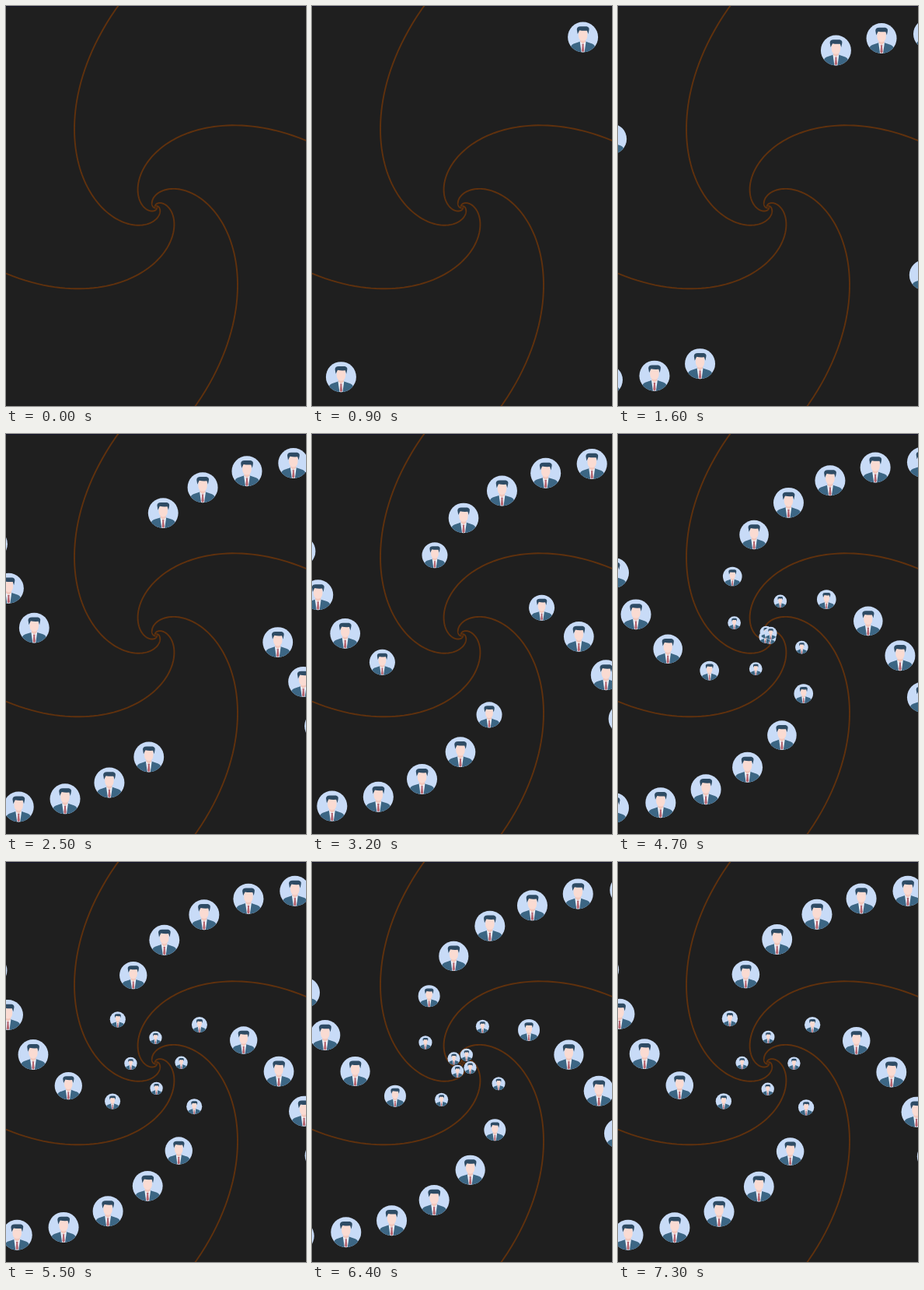
Animation of 386 by 514 pixels, one loop 7.4 s. Source, as an HTML page with a canvas:

```html
<!DOCTYPE html>
<html lang="en">
<head>
<meta charset="utf-8">
<title>Spiral queue</title>
<style>
  html, body { margin: 0; width: 100%; height: 100%; overflow: hidden; background: #1f1f1f; }
  canvas { display: block; }
</style>
</head>
<body>
<canvas id="stage" width="386" height="514"></canvas>
<script>
const ctx = document.getElementById('stage').getContext('2d');
const W = 386, H = 514, CX = 193, CY = 258.3;
const LOOP = 7400, STEP = 100;
const SPEED = 0.06944;        // radial pixels per ms
const GAP = SPEED * 604;      // radial distance between neighbours
const START = 330.6;          // radius of the leading avatar at time 0
const GROWTH = 0.955, REF_RADIUS = 145;
const ARM_ANGLE = 43.6 * Math.PI / 180;

// Point on a logarithmic spiral, turned by the given angle.
function spiral(r, turn) {
  const a = ARM_ANGLE + turn + Math.log(r / REF_RADIUS) / GROWTH;
  return [CX + r * Math.cos(a), CY + r * Math.sin(a)];
}

function fillPath(color, d) {
  ctx.fillStyle = color;
  ctx.fill(new Path2D(d));
}

// Avatar drawn in a circle of radius 20, scaled to the wanted diameter.
function avatar(x, y, diameter) {
  ctx.save();
  ctx.translate(x, y);
  ctx.scale(diameter / 40, diameter / 40);
  ctx.beginPath();
  ctx.arc(0, 0, 20, 0, 2 * Math.PI);
  ctx.fillStyle = '#c8dbf7';
  ctx.fill();
  ctx.clip();
  fillPath('#3c6684', 'M-16 20V13Q-15 9-10 8L-4 6H4L10 8Q15 9 16 13V20Z');
  fillPath('#eceff7', 'M-4 6H4L2 20H-2Z');
  fillPath('#f3c8bd', 'M-3.5 1H3.5V6L0 9L-3.5 6Z');
  fillPath('#fadbd2', 'M-5.8 -9H5.8V-1Q5 5 0 5Q-5 5-5.8-1Z');
  fillPath('#2e4b64', 'M-7 -4L-8 -10Q-8 -14-3 -14H5Q9 -13 8 -9L7 -4L5.5 -8.5Q0 -8-4.5 -9L-5.5 -7Z');
  fillPath('#b5646f', 'M-1.4 9H1.4L1 11L1.7 18L0 20L-1.7 18L-1 11Z');
  ctx.restore();
}

function drawArms() {
  ctx.strokeStyle = '#60310d';
  ctx.lineWidth = 1.9;
  for (let arm = 0; arm < 4; arm++) {
    ctx.beginPath();
    for (let r = 1; r < 340; r *= 1.03) ctx.lineTo(...spiral(r, arm * Math.PI / 2));
    ctx.stroke();
  }
}

function drawAvatars(t) {
  const front = START - SPEED * t;
  for (let arm = 0; arm < 4; arm++) {
    const turn = (arm - 1.5) * Math.PI / 2;
    for (let r = front; r < 345; r += GAP) {
      if (r <= 0.5) continue;
      const size = 16.2 + 22.8 / (1 + Math.exp((95 - r) / 13));
      avatar(...spiral(r, turn), size);
    }
  }
}

function draw(now) {
  const t = Math.floor(now % LOOP / STEP) * STEP;
  ctx.fillStyle = '#1f1f1f';
  ctx.fillRect(0, 0, W, H);
  ctx.fillStyle = '#14142a';
  ctx.fillRect(0, 0, W, 1);
  drawArms();
  drawAvatars(t);
  requestAnimationFrame(draw);
}
requestAnimationFrame(draw);
</script>
</body>
</html>
```
